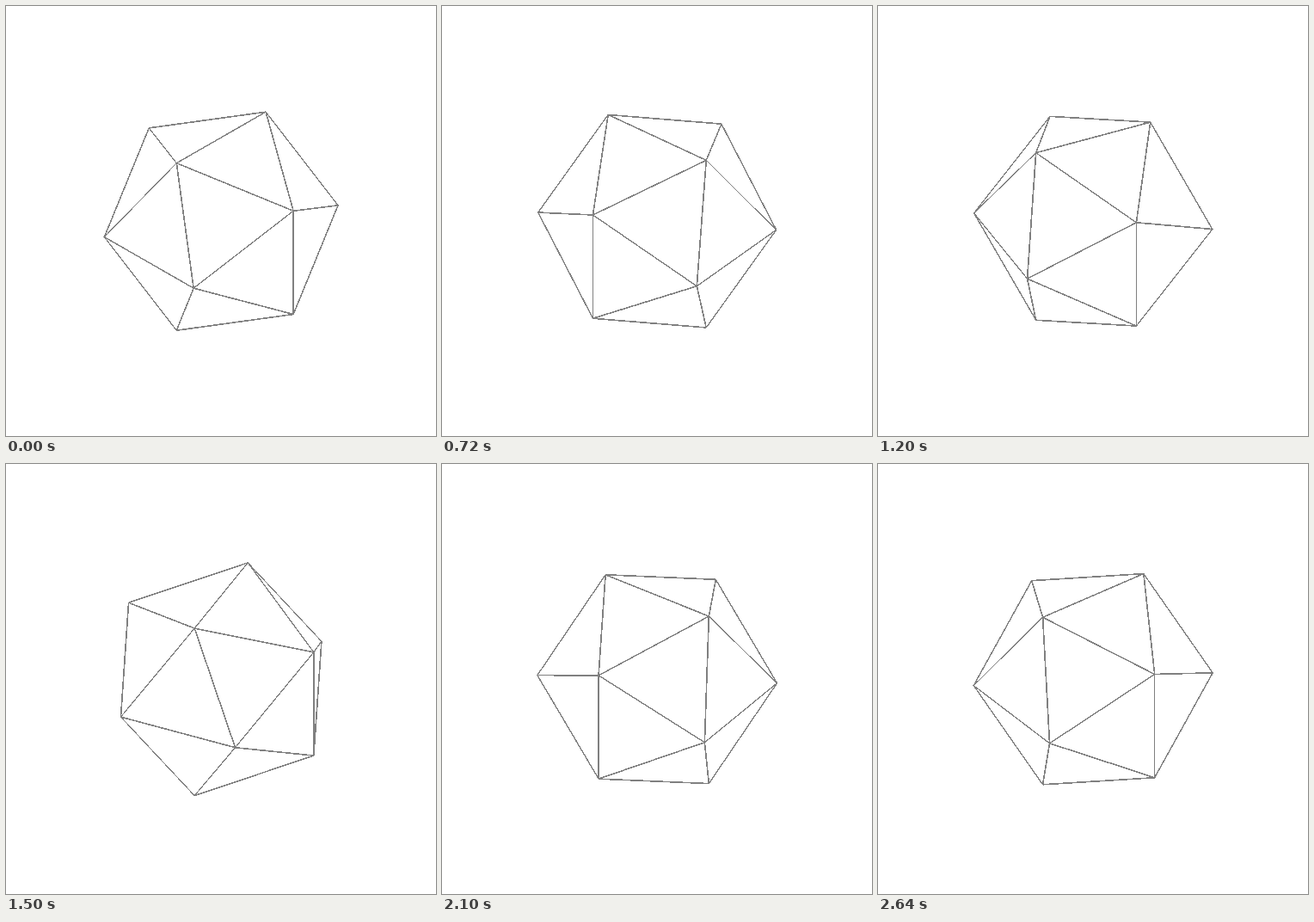
These frames come from a looping animation (500x500 px, 2.7 s). An HTML page with a canvas:

```html
<!DOCTYPE html>
<html lang="en">
<head>
<meta charset="utf-8">
<title>Turning icosahedron</title>
<style>
  html, body { margin: 0; width: 100%; height: 100%; overflow: hidden; background: #fff; }
  canvas { display: block; }
</style>
</head>
<body>
<canvas id="stage" width="500" height="500"></canvas>
<script>
const SIZE = 500, CENTER = 250.2;
const ctx = document.getElementById('stage').getContext('2d', { willReadFrequently: true });
const LOOP = 2700, STEPS = 45, STEP_MS = LOOP / STEPS;
const RADIUS = 139.6, LINE_GRAY = 128, MIN_COVER = 0.18;
const RAD = Math.PI / 180, TILT = 35 * RAD, START = 45 * RAD;
const PHI = (1 + Math.sqrt(5)) / 2;
const UNIT = RADIUS / Math.hypot(1, PHI);

// Cyclic permutations of (0, ±1, ±phi)
const vertices = [];
for (const s of [-1, 1]) {
  for (const t of [-PHI, PHI]) vertices.push([0, s, t], [s, t, 0], [t, 0, s]);
}

// Every three vertices that are mutually one edge apart form a face
const adjacent = (a, b) =>
  Math.abs(Math.hypot(...a.map((v, i) => v - b[i])) - 2) < 0.01;
const faces = [];
vertices.forEach((a, i) => {
  for (let j = i + 1; j < 12; j++) {
    for (let k = j + 1; k < 12; k++) {
      const b = vertices[j], c = vertices[k];
      if (adjacent(a, b) && adjacent(b, c) && adjacent(a, c)) faces.push([i, j, k]);
    }
  }
});

// Spin about the vertical axis, then tilt towards the viewer
function project([x, y, z], angle) {
  const side = x * Math.cos(angle) + z * Math.sin(angle);
  const depth = z * Math.cos(angle) - x * Math.sin(angle);
  return {
    x: CENTER + UNIT * side,
    y: CENTER + UNIT * (depth * Math.sin(TILT) - y * Math.cos(TILT)),
    near: depth * Math.cos(TILT) + y * Math.sin(TILT)
  };
}

// Turn soft line edges into one flat gray
function flatten() {
  const image = ctx.getImageData(0, 0, SIZE, SIZE), px = image.data;
  for (let i = 0; i < px.length; i += 4) {
    const inked = px[i + 3] > 255 * MIN_COVER;
    px[i] = px[i + 1] = px[i + 2] = inked ? LINE_GRAY : 255;
    px[i + 3] = 255;
  }
  ctx.putImageData(image, 0, 0);
}

function draw(step) {
  const points = vertices.map(v => project(v, START + step * 2 * Math.PI / STEPS));
  const edges = new Set();
  for (const face of faces) {
    if (face.reduce((sum, i) => sum + points[i].near, 0) <= 0) continue;
    const [a, b, c] = face;
    edges.add(a + ',' + b).add(b + ',' + c).add(a + ',' + c);
  }

  ctx.clearRect(0, 0, SIZE, SIZE);
  ctx.beginPath();
  for (const edge of edges) {
    const [a, b] = edge.split(',').map(i => points[i]);
    ctx.moveTo(a.x, a.y);
    ctx.lineTo(b.x, b.y);
  }
  ctx.stroke();
  flatten();
}

const begin = performance.now();
let shown = -1;
function tick() {
  const step = Math.floor(((performance.now() - begin) % LOOP) / STEP_MS);
  if (step !== shown) draw(shown = step);
  requestAnimationFrame(tick);
}
tick();
</script>
</body>
</html>
```
